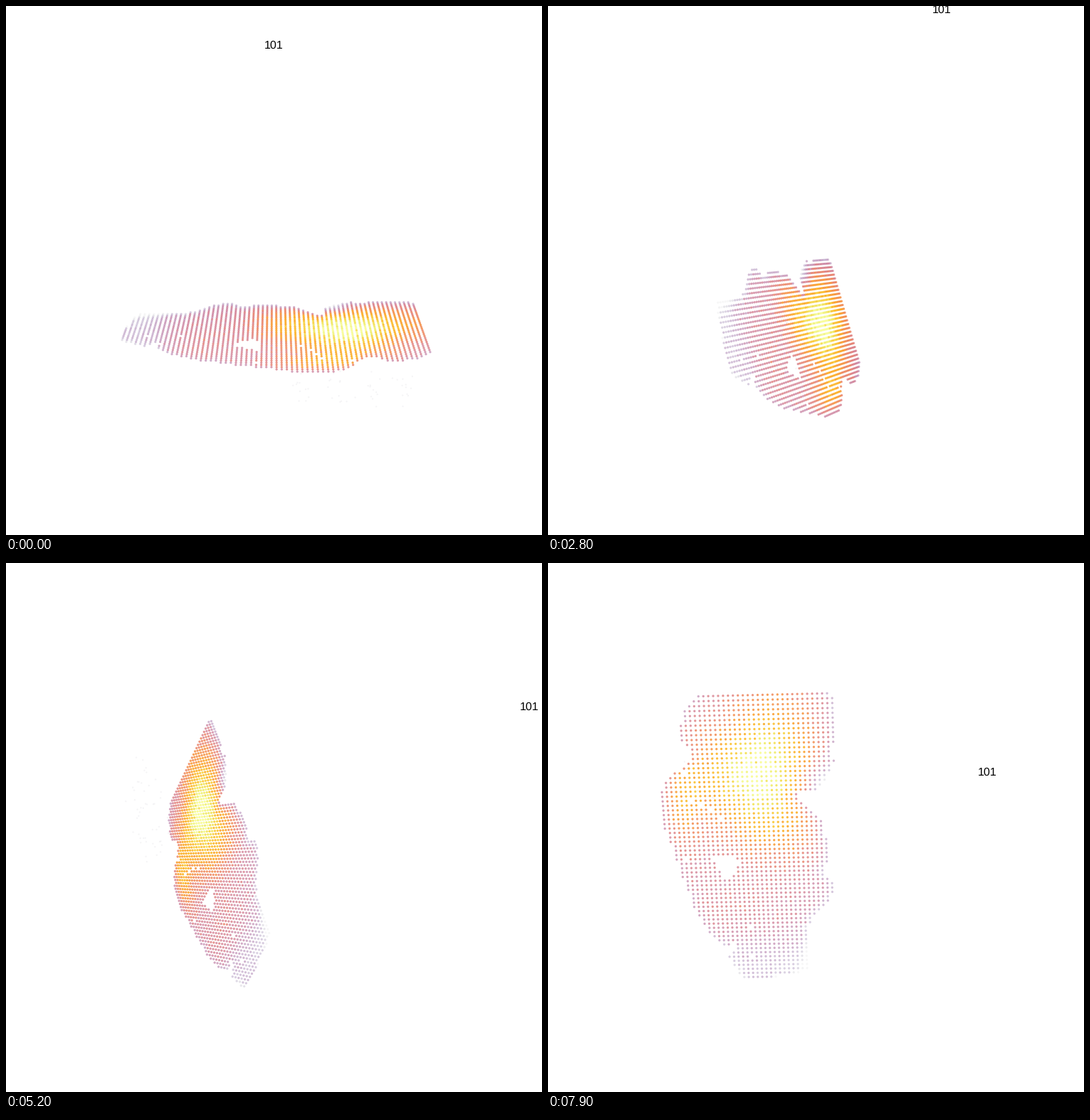
Recreate the animation shown at these times as a matplotlib script. Size 753 px wide and 744 px high, loop 8000 ms.

```python
import numpy as np
import matplotlib.pyplot as plt
from matplotlib.animation import FuncAnimation
from matplotlib.path import Path

W, H = 753, 744
CX, CY = 376.5, 372.5
FOCAL = 1388                  # 30 degree field of view, in pixels
FRAMES, STEP = 80, 3          # degrees per frame
TILT = np.radians(70)
FACE = 237                    # angle at which the slice is seen face-on
PITCH = 6.387                 # lattice spacing
CORNER = (201.2, 22, -59)     # lattice point at the top right of the slice
LABEL = (0, 276, 277)

# Slice outline and hole in face-on screen coordinates
OUTLINE = [
    (394, 180), (210, 184), (189, 206), (184, 250), (205, 272), (180, 293),
    (162, 308), (157, 325), (160, 362), (179, 415), (203, 480), (226, 521),
    (247, 540), (263, 533), (266, 543), (253, 552), (275, 586), (304, 586),
    (368, 572), (365, 516), (375, 492), (396, 474), (403, 452), (390, 436),
    (395, 408), (386, 362), (352, 333), (356, 322), (380, 320), (405, 278),
    (397, 266), (404, 250), (404, 188)]
HOLE = [(231, 413), (262, 412), (268, 424), (258, 441), (247, 442)]

plt.rcParams["text.hinting"] = "none"
rng = np.random.default_rng(101)


def rotation(deg):
    """Spin about the (1, 1, 1) diagonal, then the fixed camera tilt."""
    t = np.radians(deg)
    a = (1 + 2 * np.cos(t)) / 3
    m, n = (1 - np.cos(t)) / 3, np.sin(t) / np.sqrt(3)
    spin = np.array([[a, m - n, m + n], [m + n, a, m - n], [m - n, m + n, a]])
    c, s = np.cos(TILT), np.sin(TILT)
    return np.array([[1, 0, 0], [0, c, s], [0, -s, c]]) @ spin


def project(pts, deg):
    """Screen positions and depth (larger is nearer)."""
    x, y, d = rotation(deg) @ np.asarray(pts, float).T
    k = FOCAL / (FOCAL - d)
    return np.column_stack([CX + x * k, CY - y * k]), d


def field(face, rows, cols):
    """Smooth expression level: one hot core, cooler rims and foot."""
    x, y = face.T

    def bump(cx, cy, sx, sy):
        return np.exp(-((x - cx) / sx) ** 2 / 2 - ((y - cy) / sy) ** 2 / 2)

    v = .45 + .34 * bump(270, 300, 65, 50) + .31 * bump(315, 250, 50, 75)
    v += .20 * bump(320, 380, 50, 35) + .22 * bump(188, 340, 20, 60)
    v += .08 * bump(250, 490, 60, 30) - .20 * bump(300, 570, 80, 28)
    v -= .25 * bump(375, 575, 25, 22) + .35 * bump(388, 312, 18, 18)
    for r in np.unique(rows):
        row = rows == r
        c = cols[row]
        v[row] -= .22 * np.exp(c.min() - c) + .12 * np.exp(c - c.max())
    return np.clip(v + rng.normal(0, .03, len(v)), .03, .99)


def build_slice():
    rows, cols = (g.ravel() for g in np.meshgrid(range(64), range(-8, 41)))
    pts = CORNER - PITCH * np.column_stack([rows, cols, 0 * rows])
    face, _ = project(pts, FACE)
    keep = Path(OUTLINE).contains_points(face)
    keep &= ~Path(HOLE).contains_points(face)
    keep &= rng.random(len(pts)) > .004
    for gap in np.linspace((204, 332), (243, 357), 4):
        keep &= np.hypot(*(face - gap).T) > 4
    v = field(face[keep], rows[keep], cols[keep])
    rgba = plt.get_cmap("inferno")(v)
    rgba[:, 3] = v
    return pts[keep], rgba


def build_haze():
    """Barely visible specks below the slice."""
    pts = np.vstack([rng.normal((x, -95, -137), (6, 26, 8), (12, 3))
                     for x in np.linspace(40, 178, 4)])
    return pts, np.tile([.1, .05, .2, .04], (len(pts), 1))


tissue, tissue_rgba = build_slice()
haze, haze_rgba = build_haze()
points = np.vstack([tissue, haze])
colors = np.vstack([tissue_rgba, haze_rgba])
sizes = np.repeat([5.6, 3.0], [len(tissue), len(haze)])

fig = plt.figure(figsize=(W / 100, H / 100), dpi=100, facecolor="white")
ax = fig.add_axes([0, 0, 1, 1])
ax.set_xlim(0, W)
ax.set_ylim(H, 0)
ax.axis("off")
dots = ax.scatter(points[:, 0], points[:, 1], s=sizes, c=colors, linewidths=0)
label = ax.text(0, 0, "101", family="Liberation Sans", fontsize=11.5,
                color="black", ha="center", va="center")


def draw(i):
    deg = i * STEP
    xy, depth = project(points, deg)
    order = np.argsort(depth)
    dots.set_offsets(xy[order])
    dots.set_facecolors(colors[order])
    dots.set_sizes(sizes[order])
    label.set_position(project([LABEL], deg)[0][0])
    return dots, label


anim = FuncAnimation(fig, draw, frames=FRAMES, interval=100,
                     repeat=True, repeat_delay=0)
plt.show()
```
